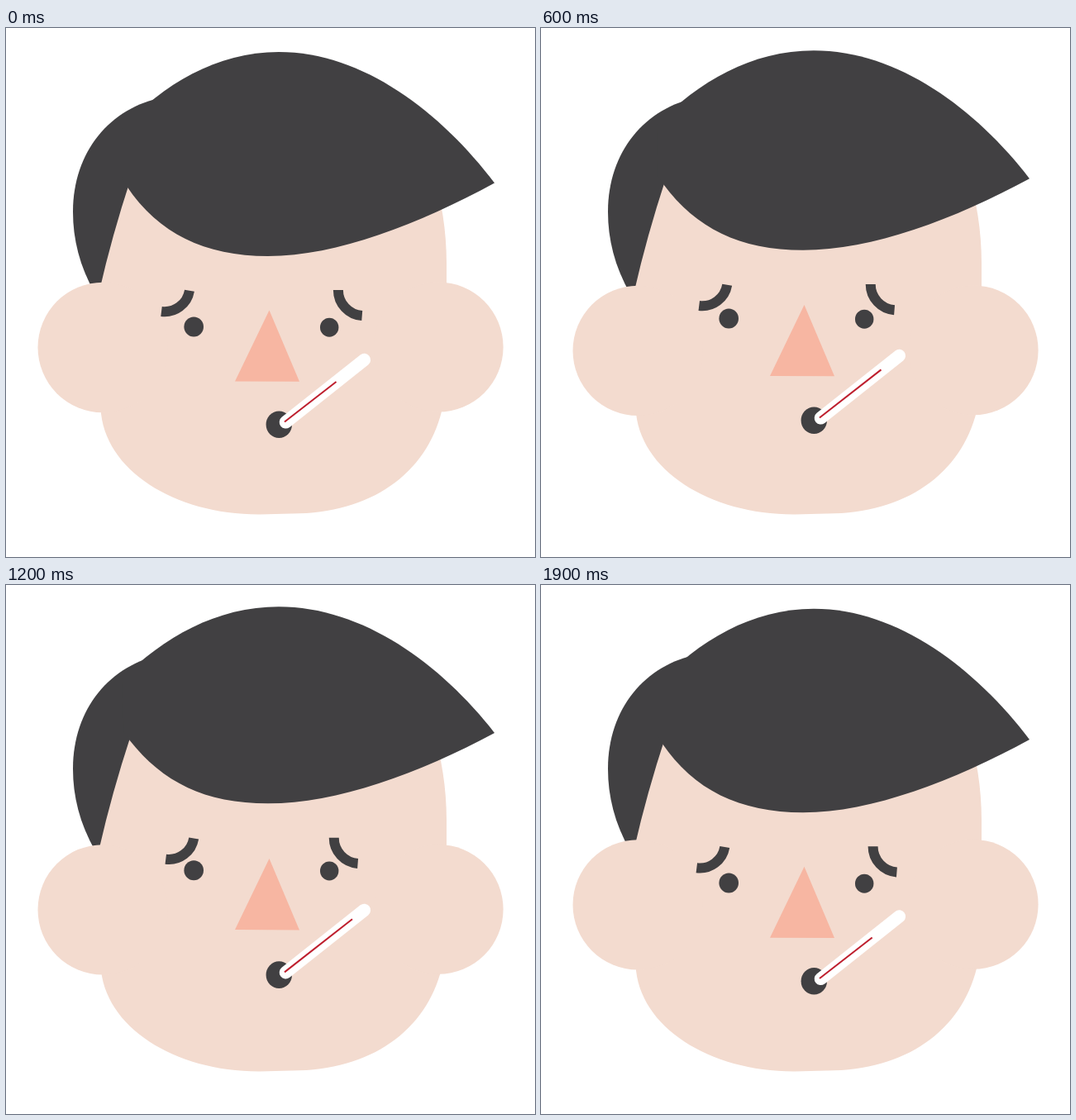
An HTML page with a canvas for the animation above (2000 ms loop, 640 px wide and 640 px high).

```html
<!DOCTYPE html>
<html lang="en">
<head>
<meta charset="utf-8">
<title>Feeling poorly</title>
<style>
html, body { margin: 0; width: 100%; height: 100%; overflow: hidden; background: #fff; }
canvas { display: block; width: 640px; height: 640px; }
</style>
</head>
<body>
<canvas id="stage" width="640" height="640"></canvas>
<script>
const ctx = document.getElementById('stage').getContext('2d');
const DARK = '#414042', SKIN = '#f3dbcf', NOSE = '#f7b6a2', RED = '#be1e2d';
const LOOP = 2000, STEP = 100;

const mix = (a, b, p) => a + (b - a) * p;
const bezier = (a, b, s) => 3 * s * (1 - s) * (1 - s) * a + 3 * s * s * (1 - s) * b + s * s * s;

// Cubic timing curve: solve x by bisection, then read y.
function ease(x) {
  if (x <= 0 || x >= 1) return x;
  let lo = 0, hi = 1;
  for (let i = 0; i < 30; i++) {
    const mid = (lo + hi) / 2;
    if (bezier(0.4, 0.8, mid) < x) lo = mid; else hi = mid;
  }
  return bezier(0.06, 1, lo);
}

// How far the face is lifted: rises for one second, then sinks.
function lift(t) {
  const x = t / (LOOP / 2);
  return x < 1 ? ease(x) : 1 - ease(x - 1);
}

function ellipse(x, y, rx, ry, color) {
  ctx.fillStyle = color;
  ctx.beginPath();
  ctx.ellipse(x, y, rx, ry, 0, 0, 2 * Math.PI);
  ctx.fill();
}

function line(x1, y1, x2, y2, width, color, cap) {
  ctx.strokeStyle = color;
  ctx.lineWidth = width;
  ctx.lineCap = cap;
  ctx.beginPath();
  ctx.moveTo(x1, y1);
  ctx.lineTo(x2, y2);
  ctx.stroke();
}

function brow(x, y, r, from, to) {
  const rad = Math.PI / 180;
  ctx.strokeStyle = DARK;
  ctx.lineWidth = 12;
  ctx.lineCap = 'butt';
  ctx.beginPath();
  ctx.arc(x, y, r, from * rad, to * rad);
  ctx.stroke();
}

const backHair = new Path2D(
  'M190 84 C126 96 81 150 81 222 C81 256 89 288 108 322 L200 322 L240 120 Z');
const face = new Path2D(
  'M113 318 Q128 252 151 182 L516 170 C527 210 533 245 533 285 L533 400 L527 464 ' +
  'C508 540 440 588 345 587.5 L307 588.5 C205 589 118 535 114.5 460 Z');

function topHair(p) {
  const y = (a, b) => mix(a, b, p);
  ctx.fillStyle = DARK;
  ctx.beginPath();
  ctx.moveTo(140, y(122, 113));
  ctx.bezierCurveTo(190, y(68, 63), 255, y(29, 26), 330, y(29, 26));
  ctx.bezierCurveTo(432, y(29, 26), 526, y(102, 95), 591, y(187.5, 178));
  ctx.bezierCurveTo(500, y(237, 227), 400, y(276, 263), 317, y(276, 263));
  ctx.bezierCurveTo(240, y(276, 263), mix(184, 190, p), y(248, 237),
    mix(146.5, 150, p), y(192, 187.5));
  ctx.lineTo(mix(140, 143, p), y(181, 178));
  ctx.closePath();
  ctx.fill();
}

function draw(p) {
  const y = (a, b) => mix(a, b, p);
  ctx.fillStyle = '#fff';
  ctx.fillRect(0, 0, 640, 640);

  ctx.fillStyle = DARK;
  ctx.fill(backHair);
  ctx.fillStyle = SKIN;
  ctx.fill(face);
  ellipse(117.2, y(386.5, 393.5), 78.7, 78.7, SKIN);
  ellipse(523.2, y(386, 393), 78.4, 78.4, SKIN);
  topHair(p);

  brow(mix(191.8, 197.6, p), y(312.6, 300.2), 30.6, 9.5, 97.1);
  brow(mix(433.2, 427.5, p), y(316.9, 304.6), 31.3, 94.5, 180);
  ellipse(227.2, y(361.5, 343.5), 11.8, 12, DARK);
  ellipse(391.2, y(362.2, 344.2), 11.2, 11.5, DARK);

  ctx.fillStyle = NOSE;
  ctx.beginPath();
  ctx.moveTo(318.5, y(341.5, 330));
  ctx.lineTo(355, y(427.7, 416.3));
  ctx.lineTo(277, y(427.5, 416));
  ctx.fill();

  ellipse(330.3, y(479.8, 470.8), 15.7, 16.3, DARK);
  line(338.4, y(476.9, 467.9), 433.4, y(401.5, 392.5), 15.4, '#fff', 'round');
  line(337, y(476.5, 467.5), mix(399.5, 421, p), y(428, 401.8), 2, RED, 'butt');
}

function frame() {
  const t = performance.now() % LOOP;
  draw(lift(Math.floor(t / STEP) * STEP));
  requestAnimationFrame(frame);
}
frame();
</script>
</body>
</html>
```
